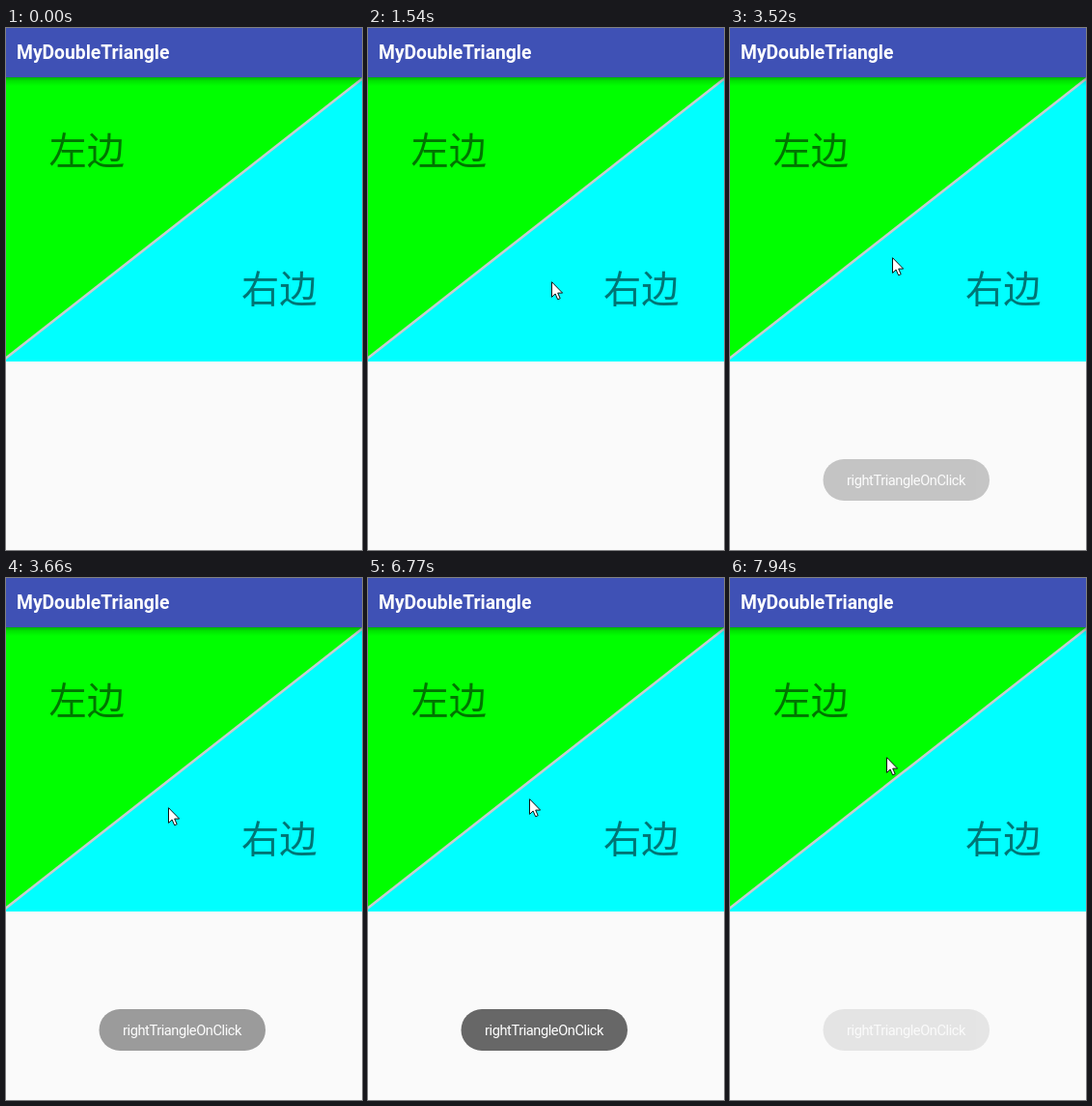
These frames come from a looping animation (369x540 px, 8000 ms). An HTML page:

```html
<!DOCTYPE html>
<html lang="zh-CN">
<head>
<meta charset="utf-8">
<title>MyDoubleTriangle</title>
<style>
  html, body { margin: 0; width: 100%; height: 100%; overflow: hidden; background: #fafafa; }
  svg { display: block; width: 369px; height: 540px; }
  text { font-family: Roboto, sans-serif; fill: #fff; }
  .title { font-size: 19.3px; font-weight: 600; }
  .label { font: 39.2px "Noto Sans CJK SC", "Noto Sans CJK", sans-serif; fill: #000; fill-opacity: .54; }
  .toast { font-size: 14.6px; letter-spacing: -.42px; }
</style>
</head>
<body>
<svg viewBox="0 0 369 540">
  <defs>
    <linearGradient id="shade" x2="0" y2="1">
      <stop stop-opacity=".32"/>
      <stop offset=".4" stop-opacity=".11"/>
      <stop offset="1" stop-opacity="0"/>
    </linearGradient>
  </defs>
  <path d="M0 51H369V53L0 341.4Z" fill="#0f0"/>
  <path d="M369 52.6V345H0V341.4Z" fill="#0ff"/>
  <path d="M-2 343L371 51" stroke="#c9ccd2" stroke-width="2.6"/>
  <rect y="51" width="369" height="9" fill="url(#shade)"/>
  <rect width="369" height="51" fill="#3f51b5"/>
  <text class="title" x="11" y="32">MyDoubleTriangle</text>
  <text class="label" x="44.5" y="141.2">左边</text>
  <text class="label" x="244" y="284.2">右边</text>
  <g id="toast">
    <rect x="96.5" y="446" width="172.5" height="43" rx="21.5" fill="#676767"/>
    <text class="toast" x="121" y="473">rightTriangleOnClick</text>
  </g>
  <path id="cursor" d="M.5 .7V16.4L4.1 13L6.7 18.8L9.2 17.7L6.7 12.1H11.6Z" fill="#fff" stroke="#111"/>
</svg>
<script>
  const LOOP = 8000, FRAME = 76, ENTER = 780;
  const cursor = document.getElementById("cursor");
  const toast = document.getElementById("toast");

  // Pointer moves: start in ms, length in frames, where the tip comes to rest
  const moves = [
    { at: ENTER, frames: 11, x: 190, y: 262 },
    { at: 1620, frames: 2, x: 189, y: 259 },
    { at: 1930, frames: 3, x: 174, y: 241 },
    { at: 2330, frames: 3, x: 168, y: 237 },
    { at: 6770, frames: 10, x: 164, y: 188 },
    { at: 7710, frames: 4, x: 162, y: 185 }
  ];

  // Progress 0..1 in whole frames; the first frame already shows one step
  function progress(t, at, frames) {
    const step = Math.floor((t - at) / FRAME + .1) + 1;
    return Math.min(1, Math.max(0, step / frames));
  }
  const easeIn = p => p * p;
  const easeOut = p => 1 - easeIn(1 - p);

  function draw(t) {
    let x = 290, y = 540;
    for (const m of moves) {
      const p = easeOut(progress(t, m.at, m.frames));
      x += (m.x - x) * p;
      y += (m.y - y) * p;
    }
    cursor.setAttribute("transform", `translate(${Math.round(x)} ${Math.round(y)})`);
    cursor.setAttribute("opacity", progress(t, ENTER, 1));

    const shown = easeOut(progress(t, 3520, 5)) - easeIn(progress(t, 7640, 5.4));
    toast.setAttribute("opacity", Math.max(0, shown));
  }

  const start = performance.now();
  function tick() {
    draw((performance.now() - start) % LOOP);
    requestAnimationFrame(tick);
  }
  tick();
</script>
</body>
</html>
```
